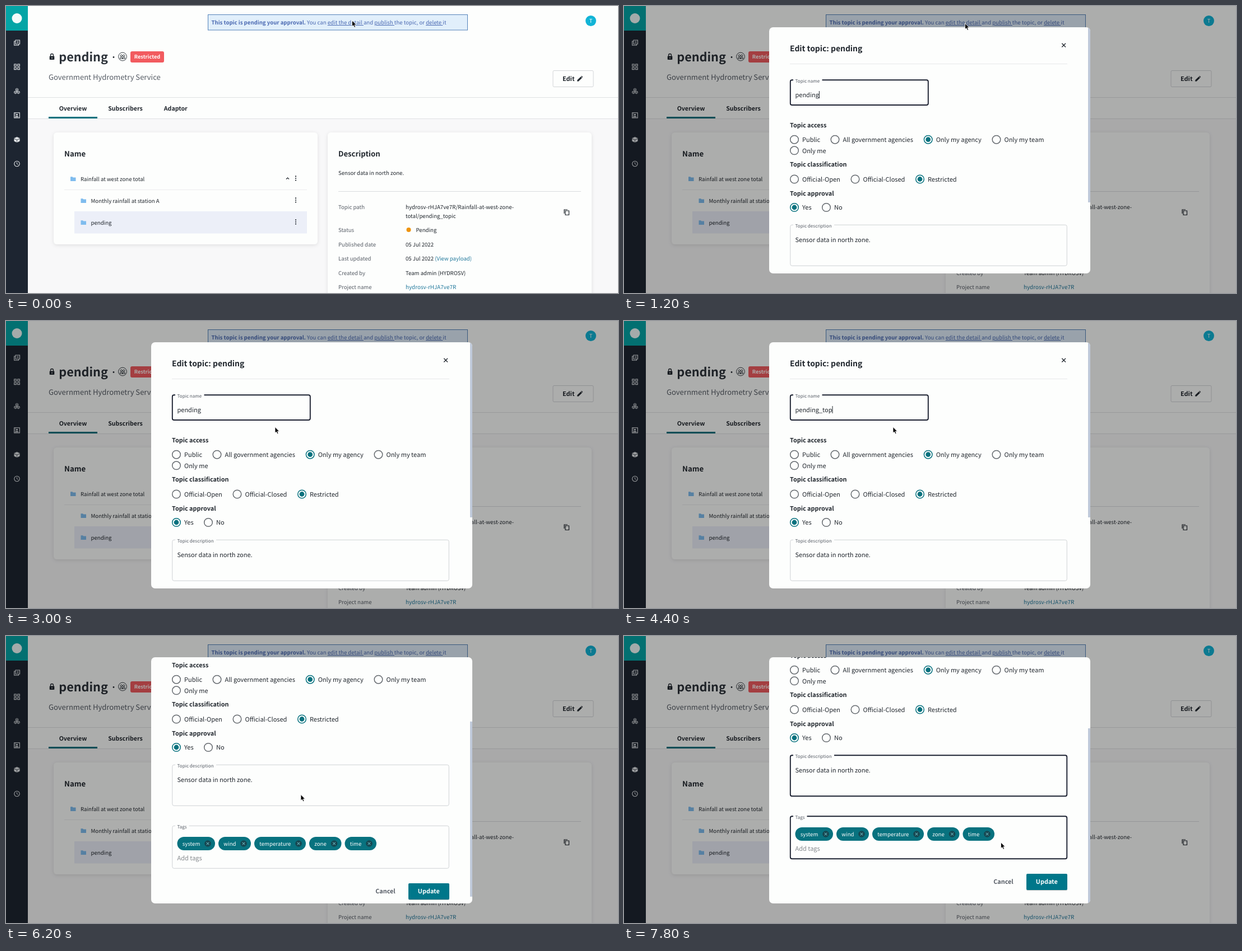
Write an HTML page that moves like this. It is 1092 by 513 pixels and loops after 8000 ms.

```html
<!DOCTYPE html>
<html lang="en">
<head>
<meta charset="utf-8">
<title>Edit topic</title>
<style>
  html, body { margin: 0; width: 100%; height: 100%; overflow: hidden; background: #fdfefd; }
  svg { display: block; width: 1092px; height: 513px; }
  text {
    font-family: "Noto Sans CJK JP", "Noto Sans CJK SC", "Noto Sans", sans-serif;
    text-rendering: geometricPrecision;
    white-space: pre;
  }
  .u { text-decoration: underline; }
</style>
</head>
<body>
<svg id="stage" viewBox="0 0 1092 513" xmlns="http://www.w3.org/2000/svg"></svg>
<script>
const INK = '#20262d', GREY = '#575d66', TEAL = '#08727f', LINK = '#22799c', PAPER = '#fdfefd';
const BODY = 9.62, FORM = 11, HEAD = 10.85;

// Text placed by the vertical centre of its capitals.
function text(x, y, str, size = BODY, { fill = INK, bold, anchor = 'start', id = '' } = {}) {
  return `<text id="${id}" x="${x}" y="${(y + size * 0.37).toFixed(2)}" font-size="${size}" fill="${fill}"
    font-weight="${bold ? 700 : 400}" text-anchor="${anchor}">${str}</text>`;
}
const rect = (x, y, w, h, fill, more = '') =>
  `<rect x="${x}" y="${y}" width="${w}" height="${h}" fill="${fill}" ${more}/>`;
const circle = (x, y, r, fill, more = '') => `<circle cx="${x}" cy="${y}" r="${r}" fill="${fill}" ${more}/>`;
const path = (d, stroke, width = 1, more = 'fill="none"') =>
  `<path d="${d}" stroke="${stroke}" stroke-width="${width}" ${more}/>`;
const at = (x, y, content) => `<g transform="translate(${x} ${y})">${content}</g>`;

function sidebar() {
  const c = '#e4e7ea';
  const cube = (x, y) => at(x, y, path('M0-2.4L2.2-1.2V1.3L0 2.5L-2.2 1.3V-1.2ZM-2.2-1.2L0 0L2.2-1.2M0 0V2.5', c, 0.8));
  const icons = [
    path('M-2.5-4.5H5V2.5H-2.5ZM-2.5-2.5H-4.8V4.8H3V2.5M0-2.3H3M0 0H3', c, 1.1),
    [-3, 3].map(x => [-3, 3].map(y => rect(x - 1.8, y - 1.8, 3.6, 3.6, 'none', `stroke="${c}" stroke-width="1.1"`)).join('')).join(''),
    cube(0, -2.5) + cube(-2.6, 2.2) + cube(2.6, 2.2),
    rect(-4.8, -4.6, 9.6, 9.2, 'none', `stroke="${c}" stroke-width="1.1"`) + circle(0, -1.2, 1.5, c) +
      path('M-2.8 3Q0-.2 2.8 3Z', c, 0.5, `fill="${c}"`) + path('M-2.8-4.6V4.6', c, 0.6),
    path('M0-4.5L5-2.3L0 0L-5-2.3Z', c, 0.4, `fill="${c}"`) +
      path('M-5-1.2L-.4 1V5L-5 2.8ZM5-1.2L.4 1V5L5 2.8Z', c, 0.2, `fill="${c}"`),
    circle(0, 0, 4.7, 'none', `stroke="${c}" stroke-width="1.1"`) + path('M0-2.8V.2L2 1.5', c),
  ];
  return rect(0, 0, 39, 513, '#1d2531') + rect(0, 0, 39, 44, '#04a5a6') + circle(19.5, 22, 9, '#f2fbfa') +
    icons.map((icon, i) => at(19.5, 65.5 + i * 43.3, icon)).join('');
}

function header() {
  const blue = '#4a69b2';
  const banner = '<tspan font-weight="700">This topic is pending your approval.</tspan> You can ' +
    '<tspan class="u">edit the detail </tspan>and <tspan class="u">publish </tspan>the topic, or ' +
    '<tspan class="u">delete </tspan>it';
  const lock = rect(-4.3, -1.5, 8.6, 6.6, INK, 'rx="1"') + path('M-2.5-1V-3A2.5 2.5 0 0 1 2.5-3V-1', INK, 1.3) +
    circle(0, 1.8, 0.9, PAPER);
  const people = circle(0, 0, 7.4, 'none', `stroke="${INK}" stroke-width=".9"`) +
    [-2.2, 2.2].map(x => circle(x, -1.6, 1.7, 'none', `stroke="${INK}" stroke-width=".9"`) +
      path(`M${x - 2.6} 3.6Q${x - 2.4} 1 ${x} 1Q${x + 2.4} 1 ${x + 2.6} 3.6Z`, INK, 0.9)).join('');
  const pencil = path('M-4.6 4.6V2.5L1.6-3.6L3.7-1.5L-2.5 4.6ZM2.3-4.3L3.2-5L5-3.2L4.3-2.2Z', INK, 0.3, `fill="${INK}"`);
  return rect(39, 0, 1053, 201, PAPER) +
    rect(360.5, 15.5, 463, 27.5, '#e1effb', 'stroke="#5483ba"') + text(366.5, 29.5, banner, BODY, { fill: blue }) +
    circle(1043.5, 26.5, 9.5, '#12b4d6') + text(1043.5, 26.5, 'T', 9.5, { fill: '#fff', anchor: 'middle' }) +
    at(82, 91, lock) + text(94.3, 91.5, 'pending', 21.6, { bold: true, fill: '#2b3138' }) +
    circle(192, 91.5, 1.4, INK) + at(208, 90.5, people) +
    rect(222, 81, 60, 20, '#f25b5f', 'rx="3"') + text(252, 91, 'Restricted', 9.25, { bold: true, fill: '#fff', anchor: 'middle' }) +
    text(76, 127, 'Government Hydrometry Service', 13.05, { fill: GREY }) +
    rect(976, 115.5, 72, 29, PAPER, 'rx="2" stroke="#d3d5d8"') + text(993, 130, 'Edit', 10.9, { bold: true }) +
    at(1024, 130, pencil) +
    path('M39 163.5H1092M39 201.5H1092', '#dfe1e3') +
    [['Overview', 119.5], ['Subscribers', 213], ['Adaptor', 302.8]]
      .map(([name, x]) => text(x, 183, name, 10.6, { bold: true, anchor: 'middle' })).join('') +
    rect(76, 198, 87, 3, TEAL);
}

function treeCard() {
  const row = (x, y, label) =>
    path(`M${x} ${y - 3.7}H${x + 3.5}L${x + 4.7} ${y - 2.6}H${x + 9.5}V${y + 4}H${x}Z`, 'none', 0, 'fill="#7fbcee"') +
    text(x + 18, y + 0.5, label) +
    [-3.6, 0, 3.6].map(d => circle(517, y - 1 + d, 1.1, INK)).join('');
  return rect(85, 226, 471, 200, PAPER, 'rx="6" filter="url(#shadow)"') +
    text(104, 264, 'Name', 13.2, { bold: true }) +
    path('M104 328.5H537', '#ececee') + rect(122, 367, 415, 39.5, '#eceff8') +
    row(115, 309, 'Rainfall at west zone total') + path('M500 309.5L502.5 307L505 309.5', INK, 1.2) +
    row(133.5, 348, 'Monthly rainfall at station A') + row(133.5, 387, 'pending');
}

function detailCard() {
  const labels = [['Topic path', 359], ['Status', 400.5], ['Published date', 426], ['Last updated', 451.5],
    ['Created by', 477], ['Project name', 502.5]];
  return rect(574, 226, 471, 320, PAPER, 'rx="6" filter="url(#shadow)"') +
    text(593, 264, 'Description', 13.2, { bold: true }) + text(593, 298.5, 'Sensor data in north zone.') +
    path('M593 331.5H1026', '#dadcdf') +
    labels.map(([name, y]) => text(593, y, name, BODY, { fill: GREY })).join('') +
    text(713, 359, 'hydrosv-rHJA7ve7R/Rainfall-at-west-zone-', 9.8) + text(713, 375, 'total/pending_topic') +
    path('M996 371V364H1002M998 366H1004.5V373.5H998Z', INK, 1.2) +
    circle(718.5, 400, 4, '#ee9410') + text(731.5, 400.5, 'Pending') +
    text(713, 426, '05 Jul 2022') +
    text(713, 451.5, `05 Jul 2022 <tspan fill="${LINK}">(View payload)</tspan>`) +
    text(713, 477, 'Team admin (HYDROSV)') + text(713, 502.5, 'hydrosv-rHJA7ve7R', 9.9, { fill: LINK });
}

function field(id, y, w, h, label, labelWidth, focused) {
  return rect(296.8, y, w, h, 'none', `id="${id}" rx="3" ${outline(focused)}`) +
    rect(302, y - 2, labelWidth + 7, 4, PAPER) + text(305.5, y + 2, label, 8.1, { fill: GREY });
}
function outline(focused) {
  return focused ? 'stroke="#1b2030" stroke-width="1.9"' : 'stroke="#cfd2d5" stroke-width="1"';
}

function modalContent() {
  const radio = (x, y, label, on) =>
    circle(x, y, 7.3, 'none', `stroke="${on ? TEAL : '#666b70'}" stroke-width="1.5"`) +
    (on ? circle(x, y, 4.4, TEAL) : '') + text(x + 14, y + 0.3, label, FORM);
  const heading = (y, label) => text(296, y, label, HEAD, { bold: true });
  const chip = ([label, x, w]) => rect(x, 520, w, 24, TEAL, 'rx="12"') +
    text(x + 9.3, 532, label, BODY, { fill: '#fff' }) + circle(x + w - 13, 532, 5.8, '#164650') +
    at(x + w - 13, 532, path('M-2.4-2.4L2.4 2.4M2.4-2.4L-2.4 2.4', '#5ea5ae', 1.2));
  const chips = [['system', 305.5, 67.5], ['wind', 379, 58], ['temperature', 443, 92], ['zone', 541, 57.5], ['time', 604.5, 56.5]];
  return text(296, 76, 'Edit topic: pending', 13.9, { bold: true }) +
    path('M781.3 66.8L788 73.5M788 66.8L781.3 73.5', INK, 1.3) + path('M296 103.5H791', '#e7e8ea') +
    field('nameBox', 132.3, 246, 44.7, 'Topic name', 44.5, true) +
    text(305.5, 158.5, 'pending', FORM, { id: 'topicName' }) + rect(0, 152, 1, 13, INK, 'id="caret"') +
    heading(213, 'Topic access') + radio(304, 238.7, 'Public') + radio(376.5, 238.7, 'All government agencies') +
    radio(542.7, 238.7, 'Only my agency', true) + radio(664.5, 238.7, 'Only my team') + radio(304, 258.3, 'Only me') +
    heading(283.3, 'Topic classification') + radio(304, 309.5, 'Official-Open') + radio(412.5, 309.5, 'Official-Closed') +
    radio(528, 309.5, 'Restricted', true) +
    heading(334.5, 'Topic approval') + radio(304, 360, 'Yes', true) + radio(361, 360, 'No') +
    field('descriptionBox', 391.3, 493.5, 73, 'Topic description', 66) + text(305.5, 418, 'Sensor data in north zone.', FORM) +
    field('tagsBox', 500.3, 493.5, 76, 'Tags', 17.5) + chips.map(chip).join('') +
    text(305.5, 558, 'Add tags', FORM, { fill: '#85898d' }) +
    text(677, 617, 'Cancel', HEAD, { bold: true, fill: GREY, anchor: 'middle' }) +
    rect(718, 603, 73, 29, '#04778a', 'rx="2" filter="url(#buttonShadow)"') +
    text(754.3, 617, 'Update', HEAD, { bold: true, fill: '#fff', anchor: 'middle' });
}

const $ = id => document.getElementById(id);
$('stage').innerHTML = `<defs>
    <filter id="shadow" x="-5%" y="-5%" width="110%" height="112%"><feDropShadow dx="0" dy="1.5" stdDeviation="3" flood-opacity=".1"/></filter>
    <filter id="buttonShadow" x="-10%" y="-20%" width="120%" height="150%"><feDropShadow dx="0" dy=".8" stdDeviation=".7" flood-opacity=".3"/></filter>
    <clipPath id="dialog"><rect x="259" y="38" width="573" height="440" rx="7"/></clipPath>
  </defs>` +
  rect(0, 0, 1092, 513, '#f8f8f9') + header() + treeCard() + detailCard() + sidebar() +
  `<g id="modal">${rect(0, 0, 1092, 513, '#000', 'opacity=".32"')}
    <g clip-path="url(#dialog)">${rect(259, 38, 573, 440, PAPER)}<g id="scroller">${modalContent()}</g>
    ${rect(828, 38, 4.5, 313, '#bfc9da', 'id="thumb"')}</g></g>` +
  `<g id="pointer">${path('M0 0V10.6L2.4 8.5L4.2 12.3L6 11.5L4.3 7.7H7.6Z', '#fff', 0.8, 'fill="#000"')}</g>`;

const LOOP = 8000, STEP = 200, MAX_SCROLL = 178;
const clamp = v => Math.min(1, Math.max(0, v));
const ease = v => v * v * (3 - 2 * v);

// Keys are [time, ...values], eased from one to the next.
function track(keys, t) {
  const i = Math.max(0, keys.findLastIndex(k => k[0] <= t));
  const a = keys[i], b = keys[i + 1] || a;
  const p = a === b ? 0 : ease(clamp((t - a[0]) / (b[0] - a[0])));
  return a.slice(1).map((v, j) => v + (b[j + 1] - v) * p);
}
const pointerKeys = [[0, 617.5, 26], [800, 609.5, 31], [1200, 608.5, 31], [2000, 480, 189.5], [4900, 480, 189.5],
  [5600, 526, 283.5], [7200, 526, 283.5], [7800, 672.5, 369]];
const scrollKeys = [[0, 0], [5800, 0], [6200, 161], [6400, MAX_SCROLL]];

function setOutline(id, focused) {
  $(id).setAttribute('stroke', focused ? '#1b2030' : '#cfd2d5');
  $(id).setAttribute('stroke-width', focused ? 1.9 : 1);
}

function draw(now) {
  const t = Math.floor((now % LOOP) / STEP) * STEP;
  const [x, y] = track(pointerKeys, t), [scroll] = track(scrollKeys, t);
  $('pointer').setAttribute('transform', `translate(${x} ${y})`);
  $('modal').style.display = t < 1200 ? 'none' : '';
  $('scroller').setAttribute('transform', `translate(0 ${-scroll})`);
  $('thumb').setAttribute('y', 38 + scroll * 127 / MAX_SCROLL);

  const typed = Math.floor(clamp((t - 3600) / 1200) * 6);
  $('topicName').textContent = 'pending' + '_topic'.slice(0, typed);
  const typing = typed > 0 && typed < 6;
  $('caret').style.display = typing || (t - 1200) % 1000 < 500 ? '' : 'none';
  if (t >= 1200) $('caret').setAttribute('x', 305.5 + $('topicName').getComputedTextLength());

  setOutline('descriptionBox', t >= 6400);
  setOutline('tagsBox', t >= 7200 && y > 322);
}

function tick() {
  draw(performance.now());
  requestAnimationFrame(tick);
}
tick();
</script>
</body>
</html>
```
